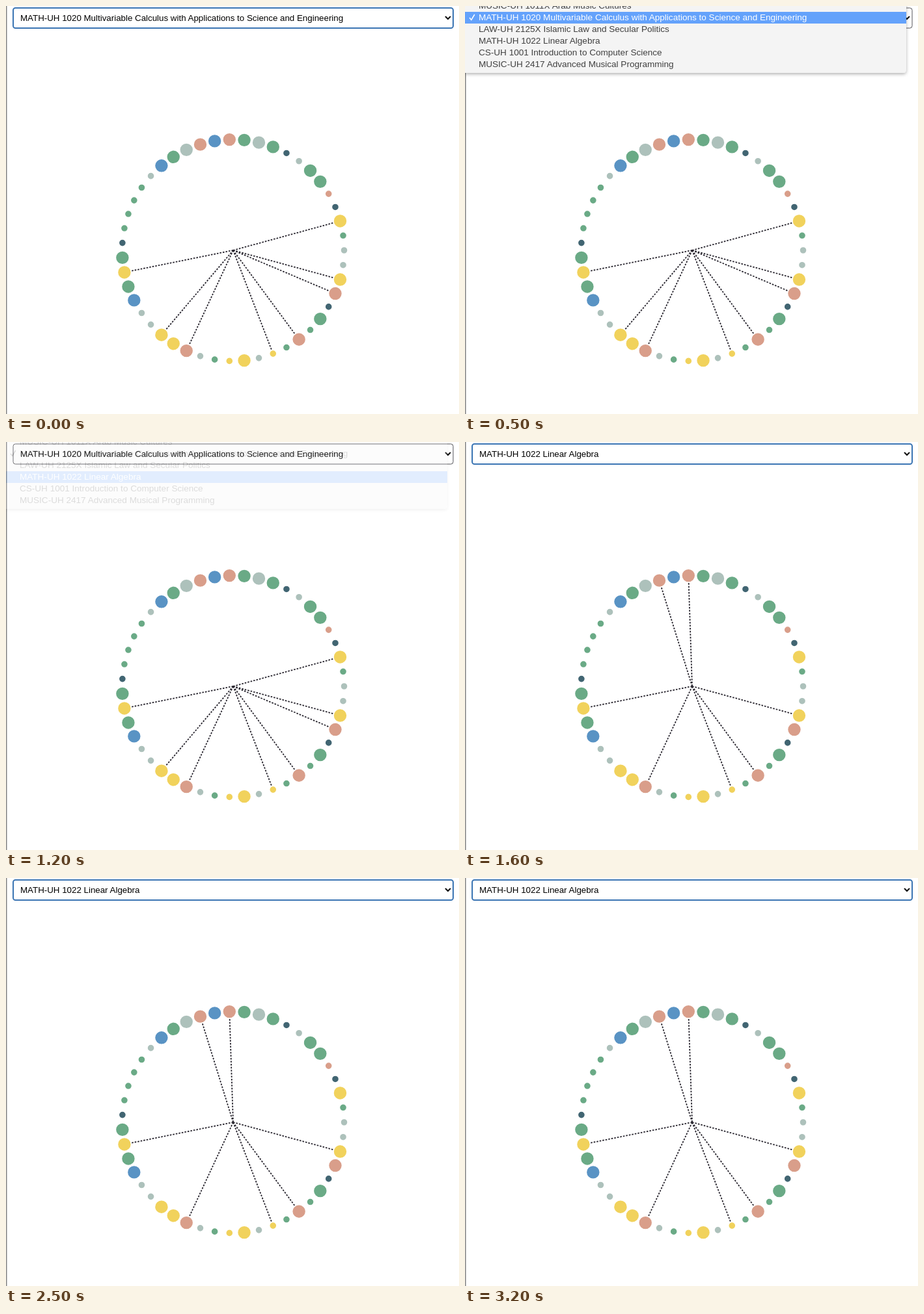
An HTML page for the animation above (3.3 s loop, 696 by 628 pixels).

```html
<!DOCTYPE html>
<html lang="en">
<head>
<meta charset="utf-8">
<title>Course wheel</title>
<style>
html, body { margin: 0; width: 100%; height: 100%; overflow: hidden; background: #fff; }
svg { display: block; font-family: "Liberation Sans", Arial, sans-serif; }
#rays line { stroke: #2a2730; stroke-width: 1.8; stroke-dasharray: 2.6 2; }
#dots circle { stroke: #fff; stroke-width: 1.4; }
#dots .hover { stroke: #3a3038; stroke-width: 1.2; }
#field { fill: #fff; stroke: #55555a; stroke-width: 1; }
#field.focus { stroke: #3b75b3; stroke-width: 2; }
#value { font-size: 13.333px; }
#menu { font-size: 13.55px; fill: #404040; }
#tip { font-size: 16px; text-anchor: middle; }
</style>
</head>
<body>
<svg width="696" height="628" viewBox="0 0 696 628">
  <defs>
    <filter id="shadow" x="-5%" y="-20%" width="110%" height="150%">
      <feDropShadow dx="0" dy="2" stdDeviation="2.5" flood-opacity=".3"/>
    </filter>
  </defs>
  <path d="M.75 0V628" stroke="#858585" stroke-width="1.5"/>
  <g id="rays"></g>
  <g id="dots"></g>
  <rect id="field" x="11" y="3" width="676" height="31" rx="3.5"/>
  <text id="value" x="22" y="23"></text>
  <path d="M675 16l4 4 4-4" fill="none" stroke="#111" stroke-width="2"/>
  <g id="menu">
    <path d="M0-10H678V98q0 5-5 5H0z" fill="#f4f4f4" filter="url(#shadow)"/>
    <rect id="bar" width="678" height="18" fill="#64a2fb"/>
    <path id="check" d="M7 18l2.700 3.500 5-8.500" fill="none" stroke-width="1.500"/>
  </g>
  <g id="tip">
    <rect x="1" y="1" width="112" height="80" rx="4" fill="#fff" stroke="#000" stroke-width="2"/>
    <text id="word" x="56.500" y="37.500"></text>
    <text x="56.500" y="55.500">Engineering</text>
  </g>
</svg>
<script>
const $ = id => document.getElementById(id);
const add = (parent, tag, attrs, text = '') => {
  const el = document.createElementNS('http://www.w3.org/2000/svg', tag);
  for (const k in attrs) el.setAttribute(k, attrs[k]);
  el.textContent = text;
  return parent.appendChild(el);
};

const CX = 349, CY = 376, R = 170.5;
const COLORS = { g: '#6aaa86', a: '#adc1bb', s: '#d99e8a', b: '#5993c4', y: '#f1d25c', d: '#416572' };
// One letter per dot, clockwise from the right; capitals are large dots.
const WHEEL = 'aaYSdGgSgyaYygaSYYaaBGYGdggggaBGASBSGAGdaGGsdYg';
const ITEMS = [
  'MUSIC-UH 1011X Arab Music Cultures',
  'MATH-UH 1020 Multivariable Calculus with Applications to Science and Engineering',
  'LAW-UH 2125X Islamic Law and Secular Politics',
  'MATH-UH 1022 Linear Algebra',
  'CS-UH 1001 Introduction to Computer Science',
  'MUSIC-UH 2417 Advanced Musical Programming'
];
const LINKS = { 1: [45, 2, 3, 7, 9, 15, 17, 22], 3: [2, 7, 9, 15, 22, 33, 35] };

const place = i => {
  const a = i * 2 * Math.PI / WHEEL.length;
  return [CX + R * Math.cos(a), CY + R * Math.sin(a)];
};
const dots = [...WHEEL].map((c, i) => {
  const [cx, cy] = place(i), key = c.toLowerCase();
  return add($('dots'), 'circle', { cx, cy, r: c === key ? 5.5 : 10.4, fill: COLORS[key] });
});
const rays = WHEEL.split('').map((c, i) => {
  const [x2, y2] = place(i);
  return add($('rays'), 'line', { x1: CX, y1: CY, x2, y2 });
});
const rows = ITEMS.map((s, i) => add($('menu'), 'text', { x: 21, y: 4.3 + 18 * i }, s));
const show = (el, on) => el.style.display = on ? '' : 'none';

function draw(t) {
  const course = t < 1300 ? 1 : 3;
  const open = t >= 100 && t < 1300;
  const row = t < 800 ? 1 : t < 900 ? 2 : 3;

  rays.forEach((el, i) => show(el, LINKS[course].includes(i)));
  $('value').textContent = ITEMS[course];
  $('field').setAttribute('class', open ? '' : 'focus');

  show($('menu'), open);
  $('menu').setAttribute('opacity', t < 1200 ? 1 : 0.18);
  $('bar').setAttribute('y', 18 * row - 9);
  $('check').setAttribute('stroke', row === 1 ? '#fff' : '#404040');
  rows.forEach((el, i) => el.setAttribute('fill', i === row ? '#fff' : '#404040'));

  const hover = t >= 1900 && t < 2500 ? 35 : t >= 2600 && t < 3000 ? 33 : -1;
  dots.forEach((el, i) => el.setAttribute('class', i === hover ? 'hover' : ''));
  show($('tip'), hover >= 0);
  $('tip').setAttribute('transform', hover === 35 ? 'translate(344 208)' : 'translate(308 215)');
  $('word').textContent = hover === 35 ? 'Computer' : 'General';
}

const start = performance.now();
function tick() {
  draw((performance.now() - start) % 3300);
  requestAnimationFrame(tick);
}
tick();
</script>
</body>
</html>
```
